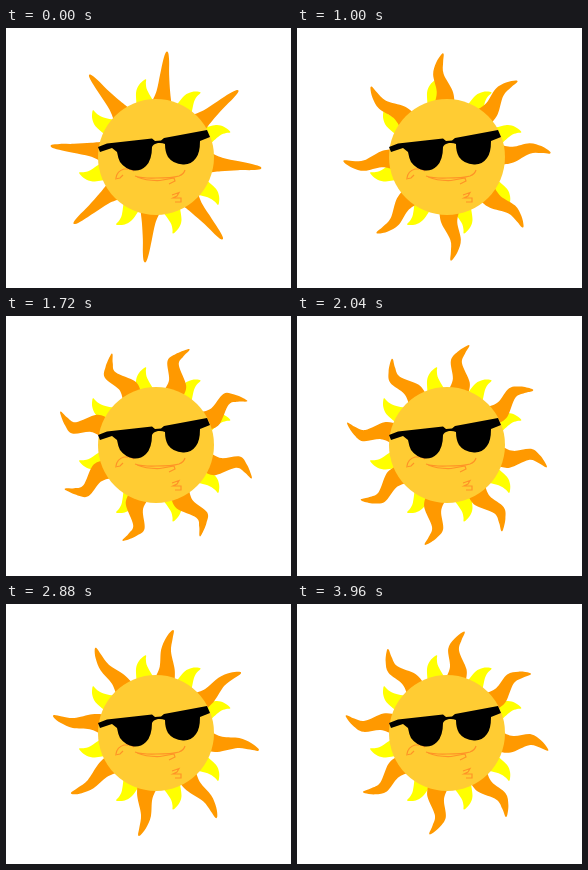
Write an HTML page with a canvas that moves like this. It is 285x260 px and loops after 4 s.

```html
<!DOCTYPE html>
<html lang="en">
<head>
<meta charset="utf-8">
<title>Cool sun</title>
<style>
html, body { margin: 0; width: 100%; height: 100%; overflow: hidden; background: #fff; }
canvas { display: block; }
</style>
</head>
<body>
<canvas id="stage" width="285" height="260"></canvas>
<script>
const ctx = document.getElementById('stage').getContext('2d');
const LOOP = 4000, STEP = 40;
const CX = 150, CY = 129, R = 58;
const RAD = Math.PI / 180;

// Turning points of the sway: tilt in degrees, bend in pixels.
const sway = [
  { at: 0, tilt: 6, bend: 0 },
  { at: 440, tilt: 7.5, bend: 10 },
  { at: 1000, tilt: -2.5, bend: 5 },
  { at: 1720, tilt: 18.7, bend: 10 },
  { at: 2360, tilt: 5.4, bend: 6.2 },
  { at: 3360, tilt: 12.8, bend: 1 },
  { at: 3960, tilt: 9.4, bend: 7 },
  { at: LOOP, tilt: 6, bend: 0 }
];
const flameAngles = [-8, 34, 71, 127, 167, 210, 258, 306];

function poseAt(t) {
  const i = sway.findIndex(p => t < p.at);
  const a = sway[i - 1], b = sway[i];
  const u = (t - a.at) / (b.at - a.at);
  const k = u * u * (3 - 2 * u);
  const mix = key => a[key] + (b[key] - a[key]) * k;
  return { tilt: mix('tilt'), bend: mix('bend') };
}

function curve(points) {
  ctx.moveTo(...points[0]);
  for (let i = 0; i < points.length - 1; i++) {
    const p = points[i], q = points[i + 1];
    const before = points[i - 1] || p, after = points[i + 2] || q;
    ctx.bezierCurveTo(
      p[0] + (q[0] - before[0]) / 6, p[1] + (q[1] - before[1]) / 6,
      q[0] - (after[0] - p[0]) / 6, q[1] - (after[1] - p[1]) / 6,
      q[0], q[1]);
  }
}

// Each joint is [radius, sideways offset, half width], from root to tip.
function ray(angle, joints) {
  const left = joints.map(([r, x, w]) => [x - w, -r]);
  const right = joints.map(([r, x, w]) => [x + w, -r]).reverse();
  ctx.save();
  ctx.translate(CX, CY);
  ctx.rotate(angle * RAD);
  ctx.beginPath();
  curve([...left, ...right]);
  ctx.fill();
  ctx.restore();
}

function drawFlames() {
  ctx.fillStyle = '#ffff00';
  const joints = [[54, -3, 9], [67, -5, 5.7], [74, -3.2, 3.4], [78, 0, 1]];
  for (const angle of flameAngles) ray(angle, joints);
}

function drawRays({ tilt, bend }) {
  const tip = 105 - bend * 0.45;
  const joints = [
    [54, 0, 10],
    [66, 0.5, 6.8 + bend * 0.22],
    [83, -bend, 4.5 + bend * 0.15],
    [tip - 8, -bend * 0.65, 3 + bend * 0.1],
    [tip, 0, 1.2]
  ];
  ctx.fillStyle = '#ff9900';
  for (let i = 0; i < 8; i++) ray(tilt + i * 45, joints);
}

const glasses = new Path2D(
  'M92 119L101 115.5L146 110.5L149 113L155 112.5L158 110L201 102L204 109L194 113' +
  'Q194 125 190 130Q185 137 177 136.5Q167 136 162 129Q159 124 159 116' +
  'Q156 114.5 152 115Q147 116 146 119Q146 132 140 138Q135 143 128 142.5' +
  'Q119 141 114 134Q112 130 111 124L106 120L94 124Z');

const lines = new Path2D(
  'M109 151L114 150L117 147M110 150Q111 143 118 141L124 141L128 143' +
  'M129 148Q137 150.5 150 150Q166 150 173 148Q178 146 179 142' +
  'M131 149Q141 153 154 152.5L168 150L169 153L163 156' +
  'M166 167L173 164.5L171 168L167 170L175 170L175 174L169 174');

function draw(t) {
  ctx.fillStyle = '#fff';
  ctx.fillRect(0, 0, 285, 260);
  drawFlames();
  drawRays(poseAt(t));

  ctx.fillStyle = '#ffcc33';
  ctx.beginPath();
  ctx.arc(CX, CY, R, 0, Math.PI * 2);
  ctx.fill();

  ctx.strokeStyle = '#ff9326';
  ctx.lineWidth = 1.2;
  ctx.stroke(lines);
  ctx.fillStyle = '#000';
  ctx.fill(glasses);
}

const start = performance.now();
function tick() {
  const t = (performance.now() - start) % LOOP;
  draw(Math.floor(t / STEP) * STEP);
  requestAnimationFrame(tick);
}
tick();
</script>
</body>
</html>
```
